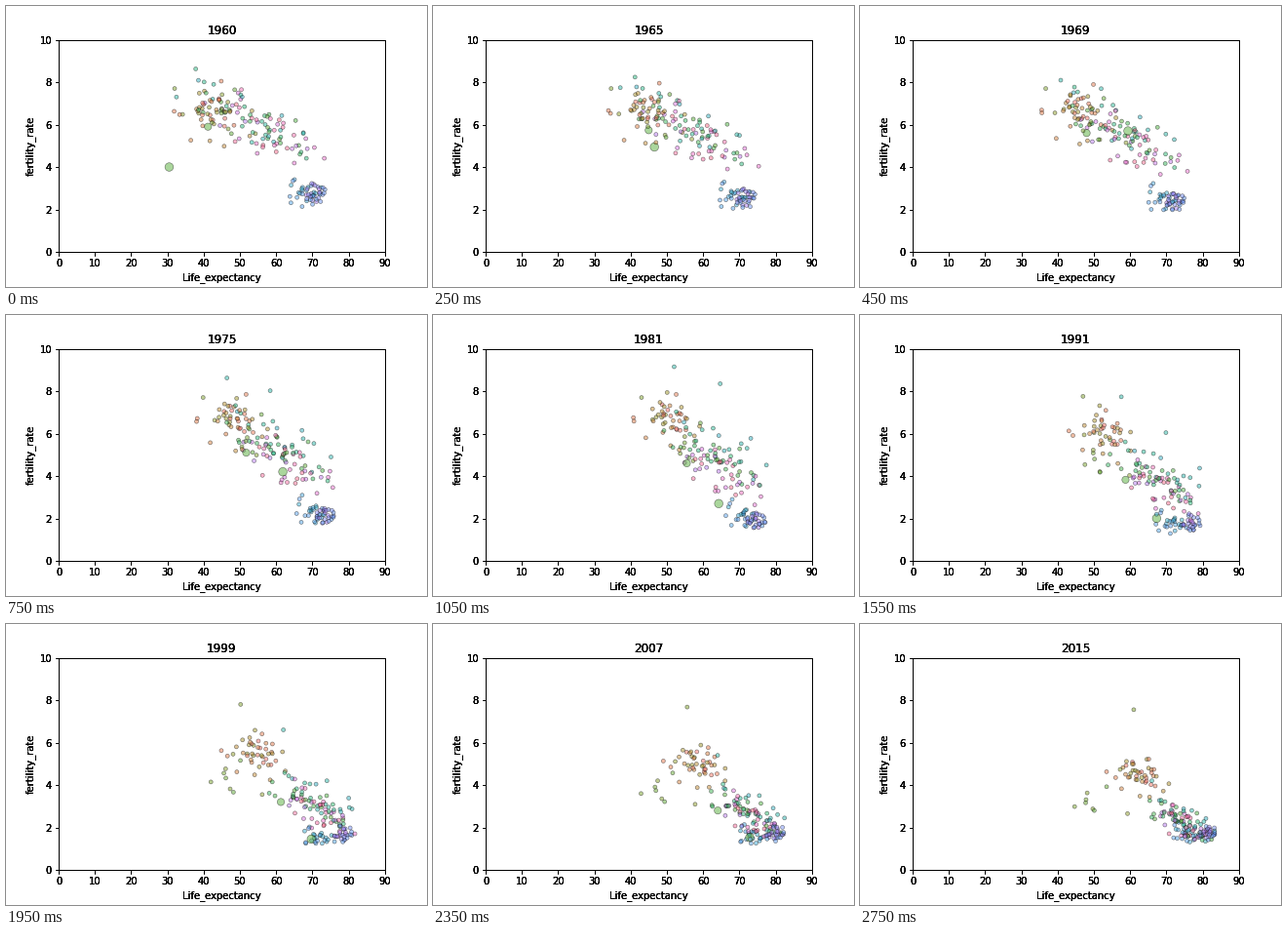
These frames come from a looping animation (432 px wide and 288 px high, 2800 ms). A matplotlib script:

```python
import numpy as np
import matplotlib.pyplot as plt
from matplotlib.animation import FuncAnimation

plt.rcParams["font.family"] = "DejaVu Sans"
plt.rcParams["font.size"] = 10

FIRST, COUNT, STEP_MS = 1960, 56, 50
KEYS = [1960, 1981, 1999, 2015]
GIANT_KEYS = [1960, 1969, 1981, 1999, 2015]
YEARS = np.arange(FIRST, FIRST + COUNT)
BOX = [0.125, 0.125, 0.775, 0.755]
DOT = 16

rng = np.random.default_rng(12)


def hue(pos):
    """Colour on a ring of eight steps with nearly equal lightness."""
    angle = (pos - np.array([7.75, 3.5, 5.75])) * np.pi / 4
    return 0.575 + np.array([0.42, 0.15, 0.42]) * np.cos(angle)


def keyed(values, keys=KEYS):
    return np.interp(YEARS, keys, values)


# size, first hue, mean life, mean fertility,
# first and last life spread, fertility spread, slope
REGIONS = [
    (42, 0.2, (42, 50, 54.3, 62), (6.6, 6.7, 5.5, 4.5), (5, 4.3), 0.75, -0.05),
    (8, 1.8, (49, 59, 50, 53), (6.4, 5.3, 4.2, 3.1), (3, 4), 0.7, -0.03),
    (26, 2.4, (51, 60.5, 67.5, 72), (6.2, 5, 3.2, 2.4), (8, 4.5), 0.6, -0.08),
    (20, 3.5, (52, 64, 71.5, 75.5), (6.8, 5.7, 3.6, 2.5), (8, 4), 0.7, -0.1),
    (24, 4.4, (67.8, 70.7, 71.5, 75.5), (2.7, 2.1, 1.45, 1.65), (2.2, 1.8), 0.35, -0.05),
    (25, 5.1, (70.3, 74.3, 78.2, 81.3), (2.65, 1.8, 1.6, 1.65), (1.5, 1.1), 0.35, 0),
    (38, 6.2, (57.5, 66, 71.8, 75.3), (5.9, 4.2, 2.9, 2.25), (7, 3.5), 0.7, -0.09),
]

# hue, life, fertility of countries that stray from their region
SINGLES = [
    (4, (32.5, 52, 62, 66), (7.3, 9.15, 6.6, 4.2)),
    (4, (42.5, 64.7, 74, 77), (7.2, 8.35, 4.2, 2.8)),
    (2, (32, 43, 50.2, 61), (7.7, 7.7, 7.8, 7.55)),
]

GIANTS = [
    (75, (30.5, 59.4, 64.3, 69.7, 76), (4, 5.7, 2.7, 1.45, 1.6)),
    (54, (41.2, 48, 55.5, 61.3, 66.8), (5.9, 5.6, 4.6, 3.2, 2.4)),
]


def wobble():
    t = (YEARS - FIRST) / COUNT
    return sum(rng.normal(0, 0.2) * np.sin(2 * np.pi * (k * t + rng.random()))
               for k in (0.7, 1.4))


def region_paths(region, last_hue):
    n, first_hue, life, births, spread_x, spread_y, slope = region
    wide = np.linspace(*spread_x, COUNT)
    tall = spread_y * np.linspace(1, 0.6, COUNT)
    for pos in np.linspace(first_hue, last_hue, n):
        zx, zy = np.clip(rng.normal(size=2), -2, 2)
        dx = wide * (zx + wobble())
        dy = slope * dx + tall * (zy + wobble())
        x = np.minimum(keyed(life) + dx, 83.3)
        y = np.maximum(keyed(births) + dy, 1.25)
        yield x, y, hue(pos), DOT


ends = [region[1] for region in REGIONS[1:]] + [7.9]
countries = [c for region, end in zip(REGIONS, ends)
             for c in region_paths(region, end)]
countries += [(keyed(x), keyed(y), hue(h), DOT) for h, x, y in SINGLES]
countries += [(keyed(x, GIANT_KEYS), keyed(y, GIANT_KEYS), hue(2.5), s)
              for s, x, y in GIANTS]
countries = [countries[i] for i in rng.permutation(len(countries))]

life = np.array([c[0] for c in countries])
births = np.array([c[1] for c in countries])
colors = [c[2] for c in countries]
sizes = np.array([c[3] for c in countries])

fig = plt.figure(figsize=(6, 4), dpi=72, facecolor="white")


def chart(face):
    ax = fig.add_axes(BOX, facecolor=face)
    ax.set(xlim=(0, 90), ylim=(0, 10), xticks=range(0, 91, 10),
           yticks=range(0, 11, 2), xlabel="Life_expectancy",
           ylabel="fertility_rate")
    return ax


# Stacked copies give the lettering its heavy edges
layers = [chart("white")] + [chart("none") for _ in range(3)]
titles = [ax.set_title(str(FIRST), fontsize=12) for ax in layers]
dots = layers[0].scatter(life[:, 0], births[:, 0], s=sizes, c=colors,
                         alpha=0.5, edgecolors="black", linewidths=0.6)


def draw(i):
    dots.set_offsets(np.column_stack([life[:, i], births[:, i]]))
    dots.set_sizes(sizes if YEARS[i] < 2013 else np.full(len(sizes), DOT))
    for title in titles:
        title.set_text(str(YEARS[i]))
    return [dots, *titles]


anim = FuncAnimation(fig, draw, frames=COUNT, interval=STEP_MS,
                     repeat=True, repeat_delay=0, blit=False)
plt.show()
```
